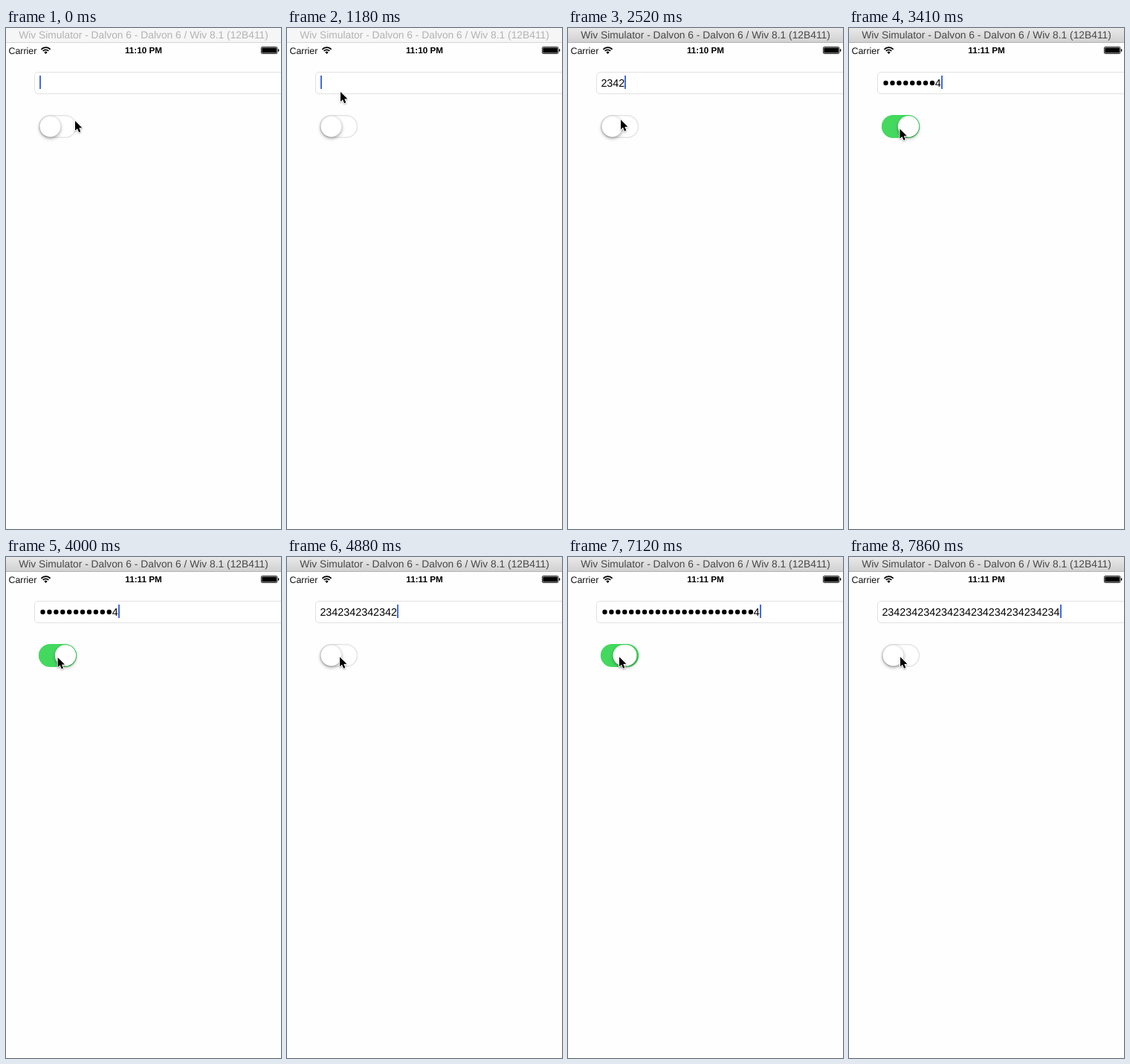
These frames come from a looping animation (370x674 px, 8 s). An HTML page with a canvas:

```html
<!DOCTYPE html>
<html lang="en">
<head>
<meta charset="utf-8">
<title>Secure field toggle</title>
<style>
html, body { margin: 0; width: 100%; height: 100%; overflow: hidden; background: #fefefe; }
canvas { display: block; width: 370px; height: 674px; }
</style>
</head>
<body>
<canvas id="stage" width="370" height="674"></canvas>
<script>
const ctx = document.getElementById('stage').getContext('2d');
const LOOP = 8000, STEPS = 54;
const SANS = '"Liberation Sans", Arial, sans-serif';
const DIGIT = 7.97, BULLET = 8.93, TEXT_X = 45;

const bursts = [
  { from: 12, to: 18, chars: 5 },
  { from: 20, to: 25, chars: 7 },
  { from: 32, to: 35, chars: 4 },
  { from: 40, to: 48, chars: 8 },
  { from: 50, to: 53, chars: 6 },
];
const presses = [17.5, 28.5, 35.5, 47.5];
const PRESS_TIME = 2.5;
const waypoints = [
  { at: 3, x: 93, y: 125 },
  { at: 8, x: 72, y: 86 },
  { at: 13, x: 72, y: 86 },
  { at: 17, x: 71, y: 123.5 },
  { at: 20, x: 68, y: 136 },
  { at: 33, x: 71, y: 134.5 },
  { at: 42, x: 69, y: 134.5 },
];

const progress = (t, from, to) => Math.min(1, Math.max(0, (t - from) / (to - from)));
const smooth = u => u * u * (3 - 2 * u);

function typingAt(step) {
  const count = bursts.reduce((n, b) => n + Math.floor(b.chars * progress(step, b.from, b.to)), 0);
  const latest = bursts.filter(b => b.from < step).pop();
  const idle = latest ? Math.max(0, step - latest.to) : step;
  return { count, idle };
}

function knobAt(step) {
  let pos = 0, stretch = 0;
  presses.forEach((p, i) => {
    const u = progress(step, p, p + PRESS_TIME);
    pos += (i % 2 ? -1 : 1) * smooth(u);
    stretch += 6 * Math.sin(Math.PI * u);
  });
  return { pos, stretch, on: pos > 0.5 };
}

function pointerAt(step) {
  const { x, y } = waypoints[0];
  return waypoints.slice(1).reduce((p, b, i) => {
    const a = waypoints[i], e = smooth(progress(step, a.at, b.at));
    return { x: p.x + (b.x - a.x) * e, y: p.y + (b.y - a.y) * e };
  }, { x, y });
}

function label(text, x, y, size, color, align = 'left', weight = '') {
  ctx.font = `${weight} ${size}px ${SANS}`;
  ctx.textAlign = align;
  ctx.fillStyle = color;
  ctx.fillText(text, x, y);
}

function pill(x, y, w, h, r) {
  ctx.beginPath();
  ctx.roundRect(x, y, w, h, r);
}

function titleBar(active) {
  const g = ctx.createLinearGradient(0, 0, 0, 19);
  g.addColorStop(0, active ? '#e9e9e9' : '#f6f6f6');
  g.addColorStop(1, active ? '#d1d1d1' : '#f6f6f6');
  ctx.fillStyle = g;
  ctx.fillRect(0, 0, 370, 19);
  ctx.fillStyle = active ? '#b2b2b2' : '#d4d4d4';
  ctx.fillRect(0, 19, 370, 1);
  label('Wiv Simulator - Dalvon 6 - Dalvon 6 / Wiv 8.1 (12B411)', 185, 14, 13.8,
    active ? '#484848' : '#b3b3b3', 'center');
}

function statusBar(clock) {
  label('Carrier', 3.5, 35, 12.4, '#111');
  label(clock, 185, 34, 11.7, '#000', 'center', 'bold');
  ctx.strokeStyle = ctx.fillStyle = '#000';
  ctx.lineWidth = 1.7;
  for (const r of [5.2, 8.3]) {
    ctx.beginPath();
    ctx.arc(53.5, 34.5, r, -Math.PI * 0.76, -Math.PI * 0.24);
    ctx.stroke();
  }
  ctx.beginPath();
  ctx.moveTo(53.5, 35);
  ctx.arc(53.5, 34.5, 2.8, -Math.PI * 0.77, -Math.PI * 0.23);
  ctx.fill();
  ctx.lineWidth = 0.8;
  pill(343.4, 25.5, 21.6, 9, 1.5);
  ctx.stroke();
  pill(344.3, 26.4, 19.8, 7.2, 0.6);
  ctx.fill();
  pill(365.8, 28.3, 1.5, 3.4, 0.8);
  ctx.fill();
}

function field({ count, idle }, secure) {
  ctx.fillStyle = '#fff';
  ctx.strokeStyle = '#e1e1e1';
  ctx.lineWidth = 1;
  pill(38.5, 59.5, 345, 29, 4.5);
  ctx.fill();
  ctx.stroke();

  const text = '234'.repeat(Math.ceil(count / 3)).slice(0, count);
  const dots = secure ? count - (idle ? 1 - (idle > 2) * -1 + (idle <= 2) - 1 : 1) : 0;
  const plainX = TEXT_X + dots * BULLET;
  const end = plainX + (count - dots) * DIGIT;
  ctx.fillStyle = '#000';
  for (let i = 0; i < dots; i++) {
    ctx.beginPath();
    ctx.arc(TEXT_X + 4.5 + i * BULLET, 74, 3.2, 0, Math.PI * 2);
    ctx.fill();
  }
  label(text.slice(dots), plainX - 0.6, 79, 14.33, '#000');
  if (idle % 7 < 3) {
    ctx.fillStyle = '#446be0';
    ctx.fillRect(Math.round(end - 0.5), 64, 2, 18);
  }
}

function toggle({ pos, stretch, on }) {
  pill(44.6, 117.7, 49.9, 29.6, 14.8);
  ctx.fillStyle = on ? '#43d95f' : '#fff';
  ctx.strokeStyle = on ? '#43d95f' : '#e4e4e4';
  ctx.lineWidth = 1.5;
  ctx.fill();
  ctx.stroke();

  ctx.save();
  ctx.shadowColor = 'rgba(0,0,0,.34)';
  ctx.shadowBlur = 4;
  ctx.shadowOffsetY = 2;
  ctx.fillStyle = '#fff';
  pill(45.3 + pos * (20.5 - stretch), 118.3, 28.4 + stretch, 28.4, 14.2);
  ctx.fill();
  ctx.restore();
  if (!on) {
    ctx.strokeStyle = 'rgba(0,0,0,.12)';
    ctx.lineWidth = 0.7;
    ctx.stroke();
  }
}

function arrow({ x, y }) {
  ctx.save();
  ctx.translate(x, y);
  ctx.scale(0.93, 0.93);
  ctx.beginPath();
  ctx.moveTo(0, 0);
  ctx.lineTo(0, 14);
  ctx.lineTo(3.2, 11);
  ctx.lineTo(5.5, 16.4);
  ctx.lineTo(7.9, 15.4);
  ctx.lineTo(5.7, 10.2);
  ctx.lineTo(10, 10);
  ctx.closePath();
  ctx.lineJoin = 'round';
  ctx.lineWidth = 2;
  ctx.strokeStyle = '#fff';
  ctx.shadowColor = 'rgba(0,0,0,.3)';
  ctx.shadowBlur = 2;
  ctx.shadowOffsetY = 1;
  ctx.stroke();
  ctx.shadowColor = 'transparent';
  ctx.fillStyle = '#000';
  ctx.fill();
  ctx.restore();
}

function draw(now) {
  const step = Math.floor((now % LOOP) / LOOP * STEPS + 0.08) % STEPS;
  const knob = knobAt(step);
  ctx.textRendering = 'geometricPrecision';
  ctx.fillStyle = '#fefefe';
  ctx.fillRect(0, 0, 370, 674);
  titleBar(step >= 11);
  statusBar(step >= 21 ? '11:11 PM' : '11:10 PM');
  field(typingAt(step), knob.on);
  toggle(knob);
  arrow(pointerAt(step));
}

const start = performance.now();
function tick() {
  draw(performance.now() - start);
  requestAnimationFrame(tick);
}
tick();
</script>
</body>
</html>
```
